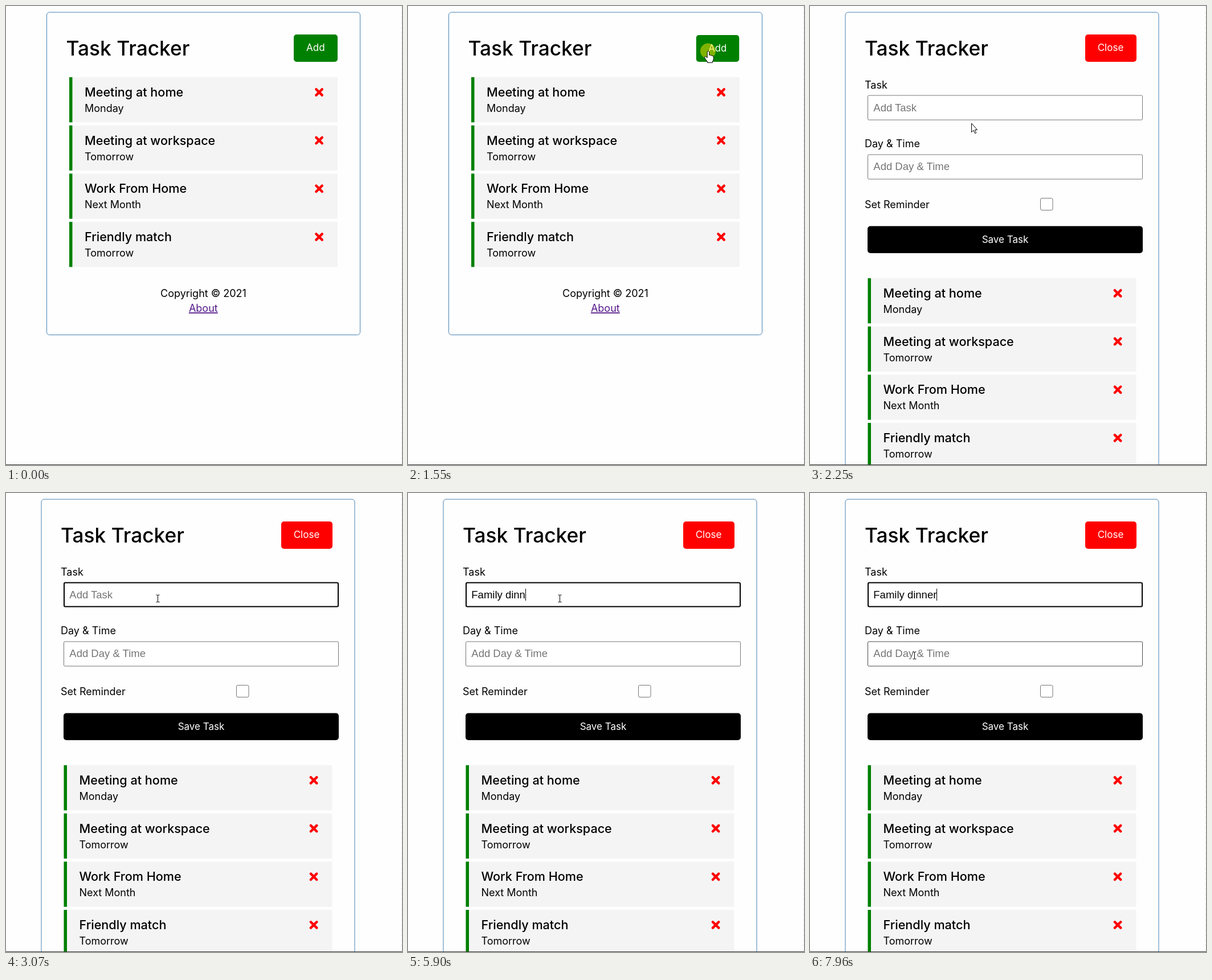
Write an HTML page that moves like this. It is 695 px wide and 806 px high and loops after 8000 ms.

```html
<!DOCTYPE html>
<html lang="en">
<head>
<meta charset="utf-8">
<title>Task Tracker</title>
<style>
  html, body { margin: 0; height: 100%; overflow: hidden; background: #fefefe; }
  svg { display: block; width: 695px; height: 806px; }
  text { font: 400 18px Inter, sans-serif; white-space: pre; }
  .title { font-size: 35.3px; font-weight: 500; }
  .name { font-size: 21.6px; font-weight: 500; }
  .button { font-size: 17px; fill: #fff; text-anchor: middle; }
  .center { text-anchor: middle; }
  .field { font: 18.5px "Liberation Sans", Arial, sans-serif; }
  .hint { fill: #757575; }
  .link { fill: #551a8b; text-decoration: underline; }
  .box { fill: #fff; stroke: #767676; }
  .pointer { fill: #fff; stroke: #000; stroke-linejoin: round; }
</style>
</head>
<body>
<svg viewBox="0 0 695 806">
  <rect id="card" y="11" rx="5" fill="none" stroke="#4682b4"/>
  <text id="title" class="title" y="87">Task Tracker</text>

  <g id="add">
    <rect x="505" y="50" width="77" height="48" rx="5" fill="#008000"/>
    <text class="button" x="543.3" y="79.3">Add</text>
  </g>

  <g id="form">
    <rect x="483" y="50" width="90" height="48" rx="5" fill="#f00"/>
    <text class="button" x="527.5" y="79.3">Close</text>
    <text x="96" y="144.5">Task</text>
    <rect id="taskBox" class="box" rx="2"/>
    <text id="taskText" class="field" x="111.3" y="185"></text>
    <rect id="caret" y="168" width="1" height="21"/>
    <text x="96" y="247.5">Day &amp; Time</text>
    <rect id="dayBox" class="box" x="101.5" y="261" width="482" height="43" rx="2"/>
    <text class="field hint" x="111.3" y="288">Add Day &amp; Time</text>
    <text x="96" y="355">Set Reminder</text>
    <rect class="box" x="404.5" y="337.5" width="21.5" height="21" rx="2.5"/>
    <rect x="101" y="386.5" width="483" height="47.5" rx="5"/>
    <text class="button" x="342.5" y="416.3">Save Task</text>
  </g>

  <g id="rows"></g>

  <g id="footer">
    <text class="center" x="346.5" y="510.5">Copyright © 2021</text>
    <text class="center link" x="346.3" y="537">About</text>
  </g>

  <path d="M694.5 0V806" stroke="#e9e9e9" stroke-dasharray="5 4"/>
  <path d="M0 805.5H695" stroke="#3a3a3a"/>

  <circle id="press" r="13.5" fill="#ffe600" fill-opacity=".5"/>
  <g id="cursor">
    <path id="arrow" class="pointer" d="M.5 0V15.5L4 12.3 6.4 17.7 8.7 16.7 6.3 11.4H10.6Z"/>
    <path id="hand" class="pointer" d="M-1.8 1.2Q0-1.2 1.8 1.2V7.2Q3.3 6.4 4.6 7.9Q6 7.2 7 8.6Q9 8 9.3 10.2V14Q9 17 7.4 18.2V20.5H-1.6V18.5Q-4.2 15.5-6.4 12Q-7.2 10-5.4 9.6Q-4 9.5-1.8 12Z"/>
    <path id="beam" fill="none" stroke="#000" d="M-2.5-6H-1L.5-5.5 2-6H3.5M.5-5.5V6M-2.5 6.5H-1L.5 6 2 6.5H3.5"/>
  </g>
</svg>
<script>
const LOOP = 8000;
const OPEN = 1590;    // the form appears
const FOCUS = 2530;   // the task field takes focus
const $ = id => document.getElementById(id);

const tasks = [
  ['Meeting at home', 'Monday'],
  ['Meeting at workspace', 'Tomorrow'],
  ['Work From Home', 'Next Month'],
  ['Friendly match', 'Tomorrow']
];
$('rows').innerHTML = tasks.map(([name, day], i) => `
  <g transform="translate(111 ${125 + i * 84.67})">
    <rect width="471" height="79.3" fill="#f4f4f4"/>
    <rect width="5.5" height="79.3" fill="#008000"/>
    <text class="name" x="27" y="34">${name}</text>
    <text x="27" y="61">${day}</text>
    <path d="M433.4 21.2l10.4 10.4m0-10.4l-10.4 10.4" stroke="#f00" stroke-width="4.4" stroke-linecap="round"/>
  </g>`).join('');

// time, x, y of the pointer's hot spot
const path = [
  [290, 0, 261], [440, 215, 150], [590, 403, 65], [690, 453, 57], [800, 475, 56],
  [1180, 475, 56], [1390, 527, 79], [1900, 527, 79],
  [2100, 350, 256], [2250, 283, 206], [2420, 266, 185],
  [7430, 266, 185], [7700, 215, 245], [7930, 183, 285]
];

const typed = [
  [4440, 'F'], [4570, 'Fa'], [4720, 'Fam'], [4950, 'Fami'], [5130, 'Famil'],
  [5230, 'Family'], [5330, 'Family '], [5430, 'Family d'], [5540, 'Family di'],
  [5770, 'Family din'], [5900, 'Family dinn'], [6230, 'Family dinnr'],
  [6590, 'Family dinn'], [6740, 'Family dinne'], [6890, 'Family dinner']
];

const presses = [[1470, OPEN], [FOCUS, 2610], [3150, 3350]];
const caretOff = [[3070, 3630], [4140, 4440], [7410, 7930]];

const within = (t, spans) => spans.some(([from, to]) => t >= from && t < to);
const show = (id, on) => $(id).style.display = on ? '' : 'none';
const set = (id, attrs) => {
  for (const key in attrs) $(id).setAttribute(key, attrs[key]);
};

function pointerAt(t) {
  const next = path.findIndex(p => p[0] > t);
  if (next < 0) return path[path.length - 1].slice(1);
  if (next === 0) return path[0].slice(1);
  const [a, b] = [path[next - 1], path[next]];
  const k = (t - a[0]) / (b[0] - a[0]);
  return [a[1] + (b[1] - a[1]) * k, a[2] + (b[2] - a[2]) * k];
}

function drawPage(t, open) {
  const dx = open ? -9.5 : 0;
  set('card', { x: 71.5 + dx, width: 550, height: open ? 920 : 566.5 });
  set('title', { x: 105.5 + dx });
  set('rows', { transform: `translate(${dx} ${open ? 353 : 0})` });
  show('add', !open);
  show('footer', !open);
  show('form', open);
  const pressed = !open && within(t, presses);
  set('add', { transform: pressed ? 'translate(10.87 1.98) scale(.98)' : '' });
}

function drawField(t, hover) {
  const focused = t >= FOCUS;
  const inset = focused ? .5 : 0;
  set('taskBox', {
    x: 101.5 + inset, y: 157 + inset, width: 482 - 2 * inset, height: 43 - 2 * inset
  });
  $('taskBox').style.stroke = focused ? '#000' : hover ? '#4a4a4a' : '';
  $('taskBox').style.strokeWidth = focused ? 2 : 1;

  const entry = typed.filter(step => step[0] <= t).pop();
  const text = $('taskText');
  text.textContent = entry ? entry[1] : 'Add Task';
  text.classList.toggle('hint', !entry);
  set('caret', { x: 111 + (entry ? Math.round(text.getComputedTextLength()) : 0) });
  show('caret', focused && !within(t, caretOff));
}

function render(t) {
  const open = t >= OPEN;
  const [x, y] = pointerAt(t);
  const overButton = x > (open ? 483 : 505) && y > 50 && y < 98;
  const overTask = open && x > 101 && x < 584 && y > 157 && y < 201;
  const overDay = open && t > 7400 && y > 261;
  const kind = overButton ? 'hand' : overTask || overDay ? 'beam' : 'arrow';

  drawPage(t, open);
  if (open) drawField(t, overTask);
  $('dayBox').style.stroke = overDay ? '#4a4a4a' : '';

  show('cursor', t >= 290);
  set('cursor', { transform: `translate(${Math.round(x)} ${Math.round(y)})` });
  for (const id of ['arrow', 'hand', 'beam']) show(id, id === kind);
  show('press', within(t, presses));
  set('press', { cx: x - .5, cy: y });
}

const start = performance.now();
function tick() {
  render((performance.now() - start) % LOOP);
  requestAnimationFrame(tick);
}
tick();
</script>
</body>
</html>
```
